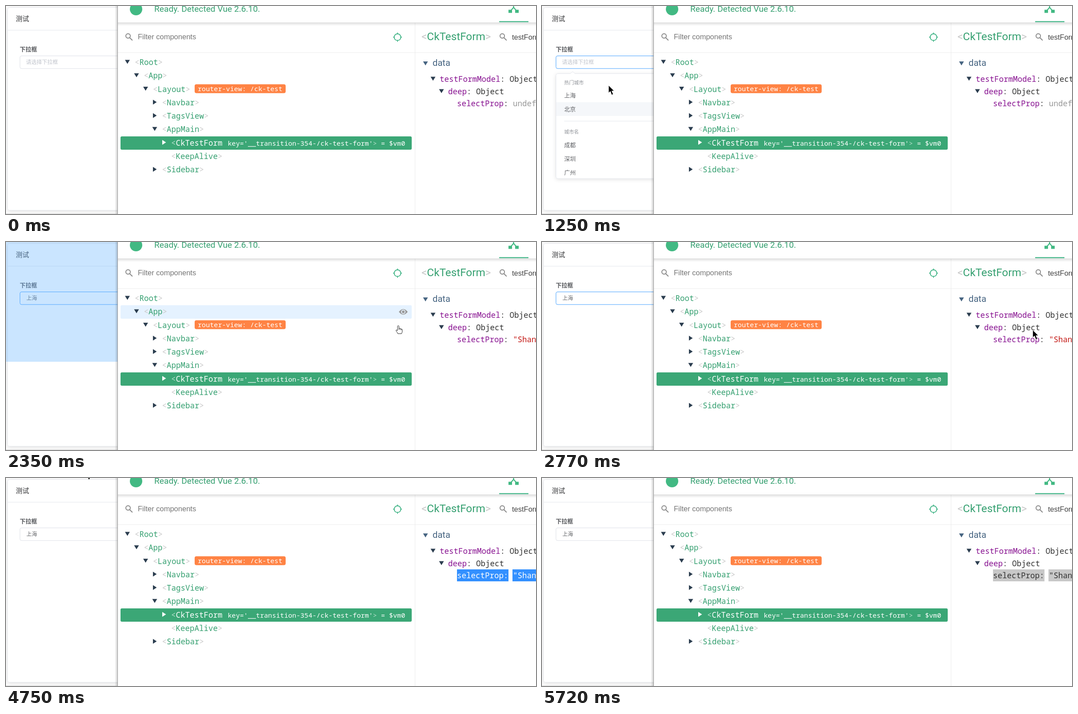
Animation of 1194 by 469 pixels, one loop 6180 ms. Source, as an HTML page:

```html
<!DOCTYPE html>
<html lang="zh">
<head>
<meta charset="utf-8">
<title>Select and component inspector</title>
<style>
  html, body { margin: 0; width: 100%; height: 100%; overflow: hidden; background: #fff; }
  svg { display: block; width: 1194px; height: 469px; }
  text { white-space: pre; }
  .cjk { font-family: "Noto Sans CJK SC", "Noto Sans CJK", "Noto Sans CJK JP", sans-serif; }
  .ui { font-family: Roboto, sans-serif; }
  .field { font-family: "Liberation Sans", Arial, sans-serif; font-size: 16.5px; }
  .mono { font-family: "Noto Sans Mono", monospace; font-size: 17.5px; font-weight: 500; }
  .small { font-size: 15.15px; }
  .green { fill: #36a071; }
  .dim { fill: #c8c8c8; }
  .key { fill: #881391; }
  .type { fill: #333; }
  .pale { fill: #b5e0cb; }
</style>
</head>
<body>
<svg viewBox="0 0 1194 469" xmlns="http://www.w3.org/2000/svg">
  <defs>
    <filter id="soft" x="-20%" y="-20%" width="140%" height="140%">
      <feDropShadow dx="0" dy="2" stdDeviation="4" flood-color="#000" flood-opacity=".11"/>
    </filter>
    <linearGradient id="fadeDown" x2="0" y2="1">
      <stop stop-color="#000" stop-opacity=".13"/><stop offset="1" stop-color="#000" stop-opacity="0"/>
    </linearGradient>
    <linearGradient id="fadeLeft" x1="1" x2="0">
      <stop stop-color="#000" stop-opacity=".18"/><stop offset="1" stop-color="#000" stop-opacity="0"/>
    </linearGradient>
    <clipPath id="menuClip"><rect x="20" y="140" width="240" height="249"/></clipPath>
    <clipPath id="pickClip"><rect id="pickWindow" x="1016" y="200" width="0" height="40"/></clipPath>
  </defs>
  <g id="page" class="cjk"></g>
  <rect id="overlay" width="252" height="270" fill="#68b6ff" fill-opacity=".35"/>
  <g id="tools"></g>
  <g id="pointer">
    <circle id="press" cy="3" r="11" fill="#ffe92e" fill-opacity=".65"/>
    <path id="arrow" d="M0 0V17L4 13.4 7 21.5 10.4 20 7.2 12.6H12.5Z" stroke="#fff" stroke-width=".8"/>
    <path id="hand" d="M-1.6 1.6Q0-.6 1.6 1.6V7Q3.2 5.8 4.4 7.4 6 6.6 7 8.3 9 8 9 10.3V14Q8.6 16.5 7.4 18.8H-1Q-2.4 15.6-5 12-5.2 9.6-3.4 10.4L-1.6 12ZM1.6 7V10M4.4 7.4V10.4M7 8.3V10.8" fill="#fff" stroke="#222"/>
  </g>
</svg>
<script>
const $ = id => document.getElementById(id);
const LOOP = 6180, STEP = 68.3;
const OPEN = 840, PICK = 1930, GRAB = 3190, DROP = 3415, BLUR = 5020;
const BLUE = '#409eff', INK = '#2c3e50', MINT = '#42b983';

const text = (x, y, body, cls = '', extra = '') => `<text x="${x}" y="${y}" class="${cls}" ${extra}>${body}</text>`;
const han = (x, y, size, color, body, extra = '') => text(x, y, body, '', `font-size="${size}" fill="${color}" ${extra}`);
const box = (x, y, w, h, extra = '') => `<rect x="${x}" y="${y}" width="${w}" height="${h}" ${extra}/>`;
const rect = (x, y, w, h, fill, extra = '') => box(x, y, w, h, `fill="${fill}" ${extra}`);
const span = (cls, body) => `<tspan class="${cls}">${body}</tspan>`;
const tag = name => span('dim', '&lt;') + span('green', name) + span('dim', '&gt;');
const down = (x, y, fill = INK) => `<path d="M${x - 5.5} ${y - 4.5}h11l-5.5 9z" fill="${fill}"/>`;
const right = (x, y, fill = INK) => `<path d="M${x - 4} ${y - 5.5}v11l8.5-5.5z" fill="${fill}"/>`;
const lens = x => `<g fill="none" stroke="#858585" stroke-width="1.9"><circle cx="${x}" cy="67.5" r="5"/><path d="M${x + 3.8} 71.5l6 6"/></g>`;

const group = (y, title, names) => han(50, y, 11, '#909399', title) +
  names.map((name, i) => han(50, y + 29.5 + 31 * i, 13, '#606266', name)).join('');

$('page').innerHTML =
  rect(0, 0, 252, 469, '#fdfdfd') +
  rect(3.5, 3.5, 270, 457, '#fff', 'rx="4" stroke="#e6e8ed" filter="url(#soft)"') +
  rect(4, 54, 250, 1, '#e4e7ec') +
  rect(0, 468, 252, 1, '#d2d2d2') +
  han(22, 34, 15, '#303133', '测试') +
  han(31, 102, 13, '#56585c', '下拉框', 'font-weight="700"') +
  rect(31.5, 112.5, 260, 28.5, '#fff', 'id="input" rx="3.5"') +
  han(45, 131, 12, '#c0c4cc', '请选择下拉框', 'id="hint"') +
  han(46, 131, 12, '#606266', '上海', 'id="value"') +
  `<g id="menu">
    ${rect(31.5, 152.5, 260, 236.5, '#fff', 'rx="4" stroke="#e4e7ed" filter="url(#soft)"')}
    <path d="M63 153l6-5 6 5" fill="#fff" stroke="#e4e7ed"/>
    <g clip-path="url(#menuClip)">
      ${rect(32, 217, 222, 31, '#f5f7fa', 'id="hoverOption"')}
      ${rect(50, 259, 210, 1, '#e4e7ed')}
      ${group(176.5, '热门城市', ['上海', '北京'])}
      ${group(288, '城市名', ['成都', '深圳', '广州'])}
    </g>
  </g>`;

// Indentation is the depth in the tree
const outline = `Root
 App
  Layout
   Navbar
   TagsView
   AppMain
    CkTestForm
    KeepAlive
   Sidebar`.split('\n');
const depthOf = line => line ? line.search(/\S/) : -1;

const selectedRow = (x, y) =>
  rect(258, 294, 656, 30, '#3ba776', 'rx="3"') + right(x - 16, y - 7, '#fff') +
  `<g fill="#fff">${text(x, y, span('pale', '&lt;') + 'CkTestForm', 'mono')}
  ${text(499.5, y, "key='__transition-354-/ck-test-form'" + span('pale', '&gt;') + ' = $vm0', 'mono small')}</g>`;

const tree = outline.map((line, i) => {
  const name = line.trim(), depth = depthOf(line);
  const x = 290 + 20.5 * depth, y = 133 + 30.27 * i;
  if (name === 'CkTestForm') return selectedRow(x, y);
  const caret = depthOf(outline[i + 1]) > depth ? down : name === 'KeepAlive' ? () => '' : right;
  return text(x, y, tag(name), 'mono') + caret(x - 16.5, y - 7);
}).join('');

const hoverRow = `<g id="hoverRow">${rect(258, 142.5, 656, 30.5, '#e5f2ff', 'rx="3"')}
  <path d="M885 157.5Q895 145 905 157.5Q895 170 885 157.5Z" fill="#999"/>
  <circle cx="895" cy="157.5" r="4" fill="#999" stroke="#e5f2ff" stroke-width="1.8"/></g>`;

const toolbar =
  rect(252, 37, 942, 8, 'url(#fadeDown)') + rect(252, 0, 942, 37, '#fff') +
  `<circle cx="293" cy="7" r="14" fill="${MINT}"/>` +
  text(334, 12.5, 'Ready. Detected Vue 2.6.10.', 'ui green', 'font-size="19.2"') +
  rect(1111, 34, 66, 2.5, '#50ba90') +
  `<path d="M1136 12L1143.5 3 1151 12M1143.5 4V-3" fill="none" stroke="${MINT}" stroke-width="2.4"/>` +
  rect(1132, 8.5, 8, 7, MINT) + rect(1147, 8.5, 8, 7, MINT);

const target = `<g fill="none" stroke="#50ba90" stroke-width="2"><circle cx="882" cy="70.3" r="7.5"/>
  <path d="M882 60v4M882 76.5v4M872 70.3h4M888 70.3h4"/></g>`;

const field = (x, y, key, rest) => text(x, y, span('key', key) + span('type', rest), 'mono');
const dataPane =
  text(936, 77, tag('CkTestForm'), 'ui', 'font-size="24.3"') +
  lens(1118) + text(1140, 75.5, 'testFormModel', 'field', 'fill="#444"') +
  down(945, 129.5, '#476582') + text(961, 135, 'data', 'ui', 'font-size="20.2" fill="#476582"') +
  down(962, 164) + field(977, 170.5, 'testFormModel', ': Object') +
  down(981, 192) + field(996, 198.5, 'deep', ': Object') +
  field(1016, 225.5, 'selectProp', ':') +
  text(1142, 225.5, 'undefined', 'mono', 'id="empty" fill="#999"') +
  text(1142, 225.5, '"Shanghai"', 'mono', 'id="filled" fill="#c41a16"') +
  `<g clip-path="url(#pickClip)">
    <g id="pickFill">${box(1016, 206, 116, 27)}${box(1141, 206, 60, 27)}</g>
    <g id="pickText">${text(1016, 225.5, 'selectProp: "Shanghai"', 'mono')}</g>
  </g>`;

$('tools').innerHTML =
  rect(245, 0, 6, 469, 'url(#fadeLeft)') + rect(251, 0, 943, 469, '#fff') + rect(251, 0, 1, 469, '#999') +
  rect(252, 104.5, 942, 1, '#ececec') + rect(921, 38, 1, 431, '#ececec') +
  toolbar + lens(275) + text(297, 75.3, 'Filter components', 'field', 'fill="#757575"') + target +
  hoverRow + tree +
  rect(425, 176.5, 205, 20, '#ff8344', 'rx="4"') +
  text(432, 192, 'router-view: /ck-test', 'mono small', 'fill="#fff"') +
  dataPane;

// Pointer moves: start, end, destination; off-stage points hide it
const entry = [1010, 480];
const moves = [
  { from: 0, to: 275, x: 255, y: 122 },
  { from: 275, to: 620, x: 150, y: 127 },
  { from: OPEN, to: 1110, x: 152, y: 228 },
  { from: 1110, to: 1250, x: 150, y: 179 },
  { from: 1250, to: 1390, x: 138, y: 196 },
  { from: PICK, to: 2490, x: 1157, y: 185 },
  { from: 2560, to: 3110, x: 1019, y: 221 },
  { from: GRAB, to: DROP, x: 1192, y: 224 },
  { from: 3810, to: 4010, x: 560, y: -30 },
  { from: 4700, to: 4750, x: 179, y: -18 },
  { from: 4750, to: 4815, x: 179, y: -40 },
  { from: BLUR, to: 5580, x: 1154, y: 436 },
  { from: 5650, to: 5715, x: 1154, y: 480 }
];

const ramp = (t, a, b) => Math.min(1, Math.max(0, (t - a) / (b - a)));
const inside = (v, a, b) => v >= a && v < b;
const show = (id, on) => $(id).style.display = on ? '' : 'none';
const set = (id, name, value) => $(id).setAttribute(name, value);

function stepped(t) {
  const { from } = moves.findLast(m => m.from <= t);
  return from + Math.floor((t - from) / STEP) * STEP;
}

function position(t) {
  let [x, y] = entry;
  for (const m of moves) {
    const k = ramp(t, m.from, m.to);
    x += (m.x - x) * k;
    y += (m.y - y) * k;
  }
  return [x, y];
}

function isClickable(x, y, menuOpen) {
  if (x < 252) return inside(y, 112, 142) || menuOpen && inside(y, 186, 248);
  if (x < 914) return x > 258 && inside(y, 112, 390);
  return x > 1015 && inside(y, 205, 235);
}

function render(time) {
  const t = stepped(time);
  const [x, y] = position(t);
  const chosen = t >= PICK + 60, active = t < BLUR + 60;
  const open = ramp(t, OPEN, 1110) * (1 - ramp(t, PICK, PICK + 200));
  const hand = isClickable(x, y, open > 0);
  const hovering = active && inside(x, 258, 914) && inside(y, 112, 240);

  set('pointer', 'transform', `translate(${x} ${y})`);
  show('hand', hand);
  show('arrow', !hand);
  show('press', [OPEN, PICK, GRAB].some(c => inside(t, c, c + 130)) || inside(t, GRAB, DROP + 60));

  set('input', 'stroke', inside(t, OPEN, GRAB) ? BLUE : '#dcdfe6');
  show('hint', !chosen);
  show('value', chosen);

  show('menu', open > 0);
  set('menu', 'opacity', open);
  set('menu', 'transform', `translate(0 ${152 * (1 - open)}) scale(1 ${open})`);
  show('hoverOption', t >= 1100);
  set('hoverOption', 'y', t < 1350 ? 217 : 186);

  show('overlay', hovering);
  show('hoverRow', hovering);

  show('empty', !chosen);
  show('filled', chosen);
  set('pickWindow', 'width', t < GRAB ? 0 : t < DROP ? Math.max(0, x - 1019) : 180);
  set('pickFill', 'fill', active ? '#3390ff' : '#c8c8c8');
  set('pickText', 'fill', active ? '#fff' : '#323232');
}

function tick() {
  render(performance.now() % LOOP);
  requestAnimationFrame(tick);
}
tick();
</script>
</body>
</html>
```
